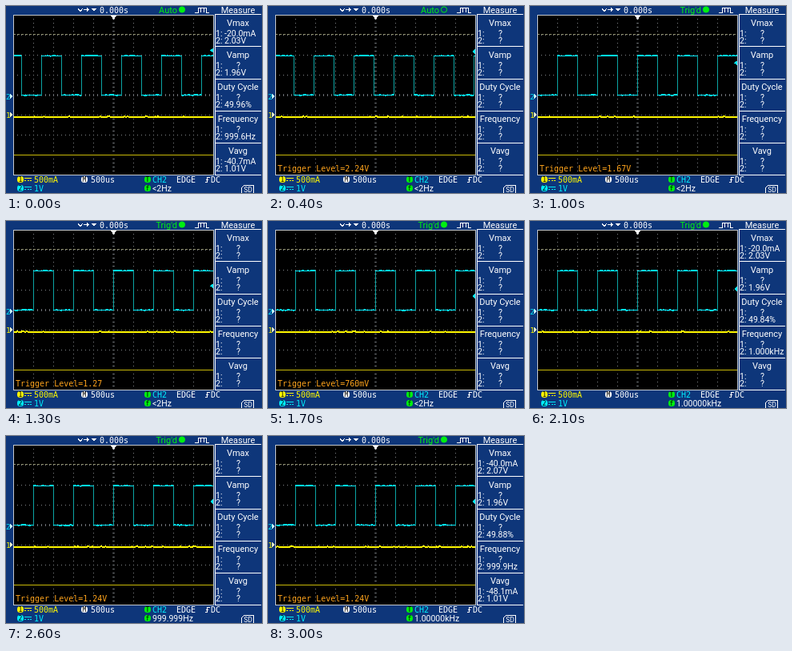
An HTML page for the animation above (3.1 s loop, 320 by 234 pixels).

```html
<!DOCTYPE html>
<html lang="en">
<head>
<meta charset="utf-8">
<title>Oscilloscope trigger level</title>
<style>
  html, body { margin: 0; width: 100%; height: 100%; overflow: hidden; background: #0e367a; }
  svg { display: block; width: 320px; height: 234px; }
  text { white-space: pre; }
  path { shape-rendering: crispEdges; }
  .ui { font-family: Roboto, sans-serif; }
  .mono { font-family: "DejaVu Sans Mono", monospace; }
</style>
</head>
<body>
<svg id="scope" viewBox="0 0 320 234"></svg>
<script>
const STEP = 100, COUNT = 31;
const L = 9, T = 11, R = 259, B = 211, DIV = 25, ZERO = 113;
const WHITE = '#fff', CYAN = '#00ecfc', YELLOW = '#fff800', GREEN = '#00f010', BLUE = '#0e367a';
const svg = document.getElementById('scope');

function add(tag, attrs, text) {
  const el = document.createElementNS('http://www.w3.org/2000/svg', tag);
  for (const key in attrs) el.setAttribute(key, attrs[key]);
  if (text !== undefined) el.textContent = text;
  return svg.appendChild(el);
}
const rect = (x, y, width, height, fill, rx = 0) => add('rect', { x, y, width, height, fill, rx });
const line = (d, stroke, width = 1, extra = {}) =>
  add('path', { d, stroke, 'stroke-width': width, fill: 'none', ...extra });
const shape = (d, fill) => add('path', { d, fill });
const label = (x, y, text, fill = WHITE, size = 10, cls = 'mono', anchor = 'start') =>
  add('text', { x, y, fill, class: cls, 'font-size': size, 'text-anchor': anchor }, text);

function badge(x, y, text, fill) {
  rect(x, y, 8, 8, fill, 3.5);
  label(x + 4, y + 7, text, '#000', 8, 'mono', 'middle');
}

// Screen and graticule
rect(0, 0, 320, 234, BLUE);
rect(L, T, R - L + 1, B - T + 1, '#000');
const dots = { 'stroke-dasharray': '1 4' };
const GRID = '#808488', TICK = '#5c6064';
line(`M134.5 ${T}V${B}`, TICK, 3, dots);
line(`M${L} 111.5H${R}`, TICK, 3, dots);
for (let x = L + DIV; x < R; x += DIV) line(`M${x + .5} ${T}V${B}`, GRID, 1, dots);
for (let y = T + DIV; y < B; y += DIV) line(`M${L} ${y + .5}H${R}`, GRID, 1, dots);
line(`M${L} 35.5H${R}`, '#8c8c6c', 1, { 'stroke-dasharray': '3 2' });
line(`M${L + .5} ${T + .5}H${R + .5}V${B + .5}H${L + .5}Z`, '#c4c8cc');

// Traces
line(`M${L + 1} 186.5H${R}`, '#c8b808');
const currentTrace = line('', YELLOW, 2);
const edges = line('', '#0ca4a4');
const flats = line('', CYAN, 1.6);
const triggerMark = shape('', CYAN);
const levelText = label(12, 207, '', '#ffa41c');
shape('M131 12h7l-3.5 5z', WHITE);

// Ground markers
label(0, 116.5, '2', CYAN, 9.5);
shape('M5 110l4 3l-4 3z', '#c8ffff');
label(0, 139.5, '1', YELLOW, 9.5);
shape('M5 133l4 3l-4 3z', '#ffffc8');

// Top bar
line('M90 3l3 4l3-4M97 4.5h6M101 2.5l2.5 2l-2.5 2', WHITE);
shape('M107 3h6l-3 4z', WHITE);
label(117, 8.5, '0.000s');
const status = label(214, 8.5, '', GREEN, 11, 'ui', 'end');
const lamp = add('circle', { cx: 220, cy: 4.5, r: 3.6, stroke: GREEN });
line('M236 8.5h4V2.5h10V8.5h4M243.5 3v5M247.5 3v5', WHITE);

// Measurement panel
line('M261.5 11V211.5', WHITE);
label(290, 8.5, 'Measure', WHITE, 11, 'ui', 'middle');
for (const y of [10.5, 50.5, 91.5, 131.5, 171.5, 211.5]) line(`M261 ${y}H319`, WHITE);
const cells = [];
['Vmax', 'Vamp', 'Duty Cycle', 'Frequency', 'Vavg'].forEach((name, i) => {
  const y = 24.5 + 40 * i;
  label(290, y, name, WHITE, 11, 'ui', 'middle');
  [13, 22.8].forEach((dy, n) => {
    label(262, y + dy, `${n + 1}:`, WHITE, 10.5, 'ui');
    cells.push(label(273, y + dy, '', WHITE, 10.5, 'ui'));
  });
});

// Bottom bar
function channel(y, n, text, fill) {
  badge(14, y, n, fill);
  line(`M23 ${y + 2.5}h9`, fill);
  line(`M23 ${y + 5.5}h9`, fill, 1, { 'stroke-dasharray': '2 1.5' });
  label(35, y + 7.8, text, fill);
}
channel(213, '1', '500mA', YELLOW);
channel(224, '2', '1V', CYAN);
badge(94, 213, 'M', WHITE);
label(106, 220.8, '500us');
badge(173, 213, 'T', GREEN);
label(183, 220.8, 'CH2', CYAN);
label(213, 220.8, 'EDGE');
line('M249 220.5h2.5V214.5h3M249.8 218.5l1.7-2l1.7 2', WHITE);
label(256, 220.8, 'DC');
badge(173, 224, 'f', GREEN);
const counter = label(183, 231.8, '', WHITE, 10.5, 'ui');
line('M294.5 234V227.5l3-3H309.5V234', WHITE);
label(302.5, 232.8, 'SD', WHITE, 8.5, 'ui', 'middle');

// Tables of [step, value]
const LEVELS = [[0, 2.3], [3, 2.3], [7, 2.07], [13, 1.27], [17, .76], [20, 1.12], [24, 1.12], [26, 1.24], [31, 1.24]];
const first = ['-20.0mA', '2.03V', '?', '1.96V', '?', '49.96%', '?', '999.6Hz', '-40.7mA', '1.01V'];
const second = ['-20.0mA', '2.03V', '?', '1.96V', '?', '49.84%', '?', '1.000kHz', '-40.7mA', '1.01V'];
const third = ['-40.0mA', '2.07V', '?', '1.96V', '?', '49.88%', '?', '999.9Hz', '-48.1mA', '1.01V'];
const READINGS = [[0, first], [4, []], [20, second.slice(0, 8)], [22, second], [25, []], [29, third]];
const COUNTER = [[0, '<2Hz'], [19, '1.00000kHz'], [25, '999.999Hz'], [28, '1.00000kHz']];

const pick = (table, k) => table.filter(row => row[0] <= k).pop()[1];

function levelAt(k) {
  const i = LEVELS.findIndex(row => row[0] > k);
  const [a, from] = LEVELS[i - 1], [b, to] = LEVELS[i];
  return from + (to - from) * (k - a) / (b - a);
}

function random(seed) {
  return () => {
    seed = (seed * 16807) % 2147483647;
    return seed / 2147483647;
  };
}

function noisy(x0, x1, y, rnd) {
  let d = `M${x0} ${y}`;
  for (let x = x0 + 2; x < x1; x += 2) d += `L${x} ${(y + (rnd() - .5) * .9).toFixed(2)}`;
  return d + `L${x1} ${y}`;
}

function drawWave(k, triggered) {
  const rnd = random(977 + 7919 * k);
  const rise = (triggered ? 34 : 44 + k * 111 / 7) % 50;
  let flat = '', edge = '';
  for (let n = -2; n < 12; n++) {
    const start = Math.round(rise + n * 25);
    const x0 = Math.max(start, L + 1), x1 = Math.min(start + 25, R);
    if (x1 <= x0) continue;
    flat += noisy(x0, x1, n % 2 ? 111.5 : 62.3, rnd);
    if (start > L) edge += `M${start + .5} 62V112`;
  }
  flats.setAttribute('d', flat);
  edges.setAttribute('d', edge);
  currentTrace.setAttribute('d', noisy(L + 1, R, 138.8, rnd));
}

function render(k) {
  const triggered = k >= 9, level = levelAt(k);
  drawWave(k, triggered);

  const y = (ZERO - level * DIV).toFixed(1);
  triggerMark.setAttribute('d', `M255 ${y}l4-3v6z`);
  const turning = (k >= 4 && k <= 18) || k >= 25;
  const value = level < 1 ? Math.round(level * 100) * 10 + 'mV' : level.toFixed(2) + (k === 13 ? '' : 'V');
  levelText.textContent = turning ? 'Trigger Level=' + value : '';

  status.textContent = triggered ? "Trig'd" : 'Auto';
  lamp.setAttribute('fill', triggered || k < 4 || k > 7 ? GREEN : BLUE);

  const readings = pick(READINGS, k);
  cells.forEach((cell, i) => {
    const text = readings[i] || '?';
    cell.textContent = text;
    cell.setAttribute('x', text === '?' ? 288 : 273);
  });
  counter.textContent = pick(COUNTER, k);
}

let shown = -1;
function tick() {
  const k = Math.floor(performance.now() / STEP) % COUNT;
  if (k !== shown) render(shown = k);
  requestAnimationFrame(tick);
}
tick();
</script>
</body>
</html>
```
